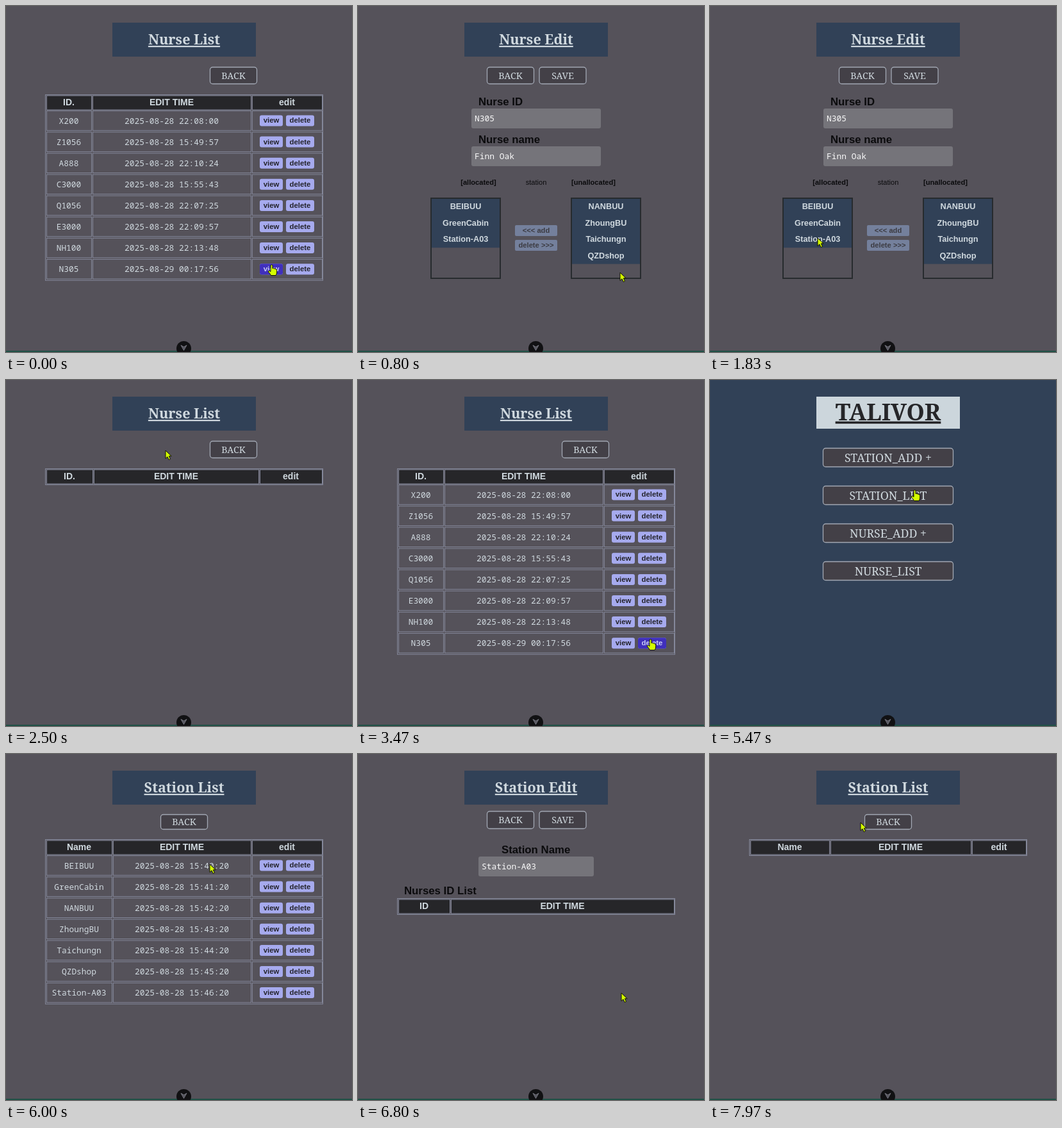
An HTML page that plays this animation: 540 px wide and 540 px high, repeating every 8000 ms.

```html
<!DOCTYPE html>
<html lang="en">
<head>
<meta charset="utf-8">
<title>Nurse station admin</title>
<style>
html, body { margin: 0; width: 100%; height: 100%; overflow: hidden; background: #55525a; }
svg { display: block; width: 100%; height: 100%; }
text { white-space: pre; }
.serif { font-family: "Noto Serif", "Liberation Serif", serif; }
.sans { font-family: "Liberation Sans", sans-serif; }
.mono { font-family: "Noto Sans Mono", "DejaVu Sans Mono", monospace; font-weight: 500; }
.b { font-weight: 700; }
.u { text-decoration: underline; }
.timed { animation: 8s step-end infinite; }
#cursor { animation: move 8s ease-in-out infinite; }
</style>
</head>
<body>
<svg id="stage" viewBox="0 0 540 540"></svg>
<script>
const LOOP = 8000;
const INK = '#262629', PALE = '#d0d9df', SLATE = '#314157', LINE = '#84889a', PAGE = '#55525a';
const BUTTON = '#434047', EDGE = '#a2a8b4', BLACK = '#0b0b0d';
const pct = t => (t / LOOP * 100).toFixed(3) + '%';
let css = '', count = 0;

// Shows content during the given [from, to] spans.
function during(spans, body) {
  const name = 'on' + count++;
  const keys = { '0.000%': 0 };
  for (const [from, to] of spans) {
    keys[pct(from)] = 1;
    if (to < LOOP) keys[pct(to)] = 0;
  }
  css += `@keyframes ${name}{${Object.entries(keys).map(([k, v]) => `${k}{opacity:${v}}`).join('')}}`;
  return `<g class="timed" style="animation-name:${name}">${body}</g>`;
}

const rect = (x, y, w, h, fill, stroke = 'none', r = 0, sw = 1) =>
  `<rect x="${x}" y="${y}" width="${w}" height="${h}" rx="${r}" fill="${fill}" stroke="${stroke}" stroke-width="${sw}"/>`;
const text = (s, x, cy, size, cls, fill, anchor = 'middle') =>
  `<text x="${x}" y="${cy + size * .35}" font-size="${size}" class="${cls}" fill="${fill}" text-anchor="${anchor}">${s.replace(/</g, '&lt;')}</text>`;

const title = s => rect(166, 26, 224, 53, SLATE) + text(s, 278, 52.5, 21.6, 'serif b u', PALE);
const button = (s, x, y, w = 73, h = 27, size = 14.2) =>
  rect(x + .5, y + .5, w, h - 1, BUTTON, EDGE, 4, 1.3) +
  text(s, x + w / 2 + .5, y + h / 2 + .3, size, 'serif', PALE);
const pill = (s, x, cy, w, hot) =>
  rect(x, cy - 8.5, w, 17, hot ? '#4030bc' : '#a6aaee', 'none', 3) +
  text(s, x + w / 2, cy - .5, 11.4, 'sans b', hot ? '#c8ccf4' : '#24242c');
const field = (s, x, y, w) =>
  rect(x, y, w, 31, '#75747a', 'none', 3) + text(s, x + 5, y + 15.5, 12.9, 'mono', '#fbfbfb', 'start');
const label = (s, x, cy) => text(s, x, cy, 16.8, 'sans b', BLACK, 'start');

const rowY = (y, i) => y + 41 + 33.1 * i;
function table(y, edges, heads, rows = []) {
  const cell = (c, top, h, fill) =>
    rect(edges[c] + 1.5, top, edges[c + 1] - edges[c] - 2, h, fill, LINE);
  const mid = c => (edges[c] + edges[c + 1]) / 2;
  let out = rect(61.5, y + .5, 433, 25 + 33.1 * rows.length, 'none', LINE);
  heads.forEach((s, c) => {
    out += cell(c, y + 2, 22, INK) + text(s, mid(c), y + 12.5, 14, 'sans b', PALE);
  });
  rows.forEach((row, i) => {
    const cy = rowY(y, i);
    heads.forEach((_, c) => {
      out += cell(c, y + 25.7 + 33.1 * i, 30.6, 'none');
      if (c < 2) out += text(row[c], mid(c), cy, 12.9, 'mono', PALE);
    });
    out += pill('view', 396, cy, 36) + pill('delete', 437, cy, 44);
  });
  return out;
}

const day = '2025-08-28 ';
const nurses = [
  ['X200', day + '22:08:00'], ['Z1056', day + '15:49:57'], ['A888', day + '22:10:24'],
  ['C3000', day + '15:55:43'], ['Q1056', day + '22:07:25'], ['E3000', day + '22:09:57'],
  ['NH100', day + '22:13:48'], ['N305', '2025-08-29 00:17:56']
];
const left = ['BEIBUU', 'GreenCabin', 'Station-A03'];
const right = ['NANBUU', 'ZhoungBU', 'Taichungn', 'QZDshop'];
const stations = [...left.slice(0, 2), ...right, left[2]].map((s, i) => [s, day + '15:4' + i + ':20']);

const nurseHeads = ['ID.', 'EDIT TIME', 'edit'];
const nurseFull = [62, 134, 383, 494];
const stationHeads = ['Name', 'EDIT TIME', 'edit'];

function picker(x, items) {
  let out = rect(x + 1, 300, 108, 125, 'none', '#272b2e', 0, 2) +
    rect(x + 2, 301, 106, 25.4 * items.length, SLATE);
  items.forEach((s, i) => out += text(s, x + 55, 313 + 25.4 * i, 12.7, 'sans b', PALE));
  return out;
}
const mover = (s, y) =>
  rect(245, y, 66, 17, '#74809c', 'none', 2) + text(s, 278, y + 8, 11.2, 'sans b', '#3c3b42');

const nurseList =
  during([[0, 270], [2470, 4800]], title('Nurse List') + button('BACK', 318, 95)) +
  during([[0, 270], [2600, 3660]], table(138, nurseFull, nurseHeads, nurses)) +
  during([[3790, 4800]], table(138, nurseFull, nurseHeads, nurses.slice(0, 7))) +
  during([[2470, 2600], [3660, 3790]], table(138, [62, 136, 395, 494], nurseHeads)) +
  during([[0, 270]], pill('view', 396, rowY(138, 7), 36, true)) +
  during([[3180, 3660]], pill('delete', 437, rowY(138, 7), 44, true));

const nurseEdit =
  during([[270, 2470]],
    title('Nurse Edit') + button('BACK', 201, 95) + button('SAVE', 282.5, 95) +
    label('Nurse ID', 188, 149) + field('N305', 177, 160, 202) +
    label('Nurse name', 188, 208) + field('Finn Oak', 177, 219, 202) +
    text('[allocated]', 188, 275, 11.1, 'sans b', BLACK) +
    text('station', 278, 275, 11.1, 'sans', BLACK) +
    text('[unallocated]', 367.5, 275, 11.1, 'sans b', BLACK) +
    mover('<<< add', 342) + mover('delete >>>', 365)) +
  during([[550, 2470]], picker(113, left) + picker(332, right));

const menu = during([[4800, 5600]],
  rect(0, 0, 540, 540, SLATE) + rect(166, 26, 224, 50, '#ccd6dc') +
  text('TALIVOR', 278, 50, 36, 'serif b u', INK) +
  ['STATION_ADD +', 'STATION_LIST', 'NURSE_ADD +', 'NURSE_LIST']
    .map((s, i) => button(s, 176, 106 + 59 * i, 203, 30, 17.8)).join(''));

const stationList =
  during([[5600, 6680], [7830, LOOP]], title('Station List') + button('BACK', 241, 94, 73, 24)) +
  during([[5600, 5730], [7830, LOOP]], table(133, [62, 187, 408, 494], stationHeads)) +
  during([[5730, 6680]], table(133, [62, 166, 383, 494], stationHeads, stations)) +
  during([[6400, 6680]], pill('view', 396, rowY(133, 6), 36, true));

const stationEdit = during([[6680, 7830]],
  title('Station Edit') + button('BACK', 201, 89, 73, 28) + button('SAVE', 282.5, 89, 73, 28) +
  label('Station Name', 224, 149) + field('Station-A03', 188, 160, 180) +
  label('Nurses ID List', 72, 213) + table(225, [62, 144, 494], ['ID', 'EDIT TIME']));

const footer = rect(0, 538, 540, 2, '#1f5046') +
  `<circle cx="277.5" cy="534.5" r="11.5" fill="#111113"/>
   <path d="M273 529.5L277.5 532L282 529.5L277.5 537.5Z" fill="#55555e" stroke="#84848e" stroke-width=".8"/>`;

const hands = [[0, 270], [2230, 2470], [3180, 3660], [4320, 4560], [5330, 5600], [6400, 6680], [7600, 7830]];
const arrows = hands.map(([, to], i) => [to, i + 1 < hands.length ? hands[i + 1][0] : LOOP]);
const skin = 'fill="#d4ff00" stroke="#101000" stroke-linejoin="round"';
const cursor = `<g id="cursor">` +
  during(arrows, `<path d="M0 0V12.5L3 9.8L5.2 14.5L7.5 13.4L5.4 8.8H9.2Z" ${skin}/>`) +
  during(hands, `<path d="M0 .5Q1.5 -1 3 .5V5.5Q4.5 4.5 5.7 6Q7.2 5.3 8 6.8Q9.7 6.5 9.7 8.5V12Q9.5 14.5 8 16.5H.5Q-1 13.5 -3.5 11Q-4 8.5 -1.8 9.1L0 10.5Z" ${skin}/>`) + `</g>`;

const path = [
  [0, 413, 404], [270, 413, 404], [780, 409, 416], [900, 409, 416], [1330, 168, 362],
  [1830, 168, 362], [2270, 249, 110], [2770, 249, 110], [2930, 463, 368],
  [3100, 463, 368], [3200, 455, 405], [4000, 455, 405], [4370, 373, 105],
  [5070, 373, 105], [5400, 318, 172], [6000, 318, 172], [6430, 411, 373],
  [7000, 411, 373], [7650, 235, 107], [LOOP, 235, 107]
];
css += `@keyframes move{${path.map(([t, x, y]) => `${pct(t)}{transform:translate(${x}px,${y}px)}`).join('')}}`;

document.head.appendChild(document.createElement('style')).textContent = css;
document.getElementById('stage').innerHTML = rect(0, 0, 540, 540, PAGE) +
  nurseList + nurseEdit + menu + stationList + stationEdit + footer + cursor;
</script>
</body>
</html>
```
